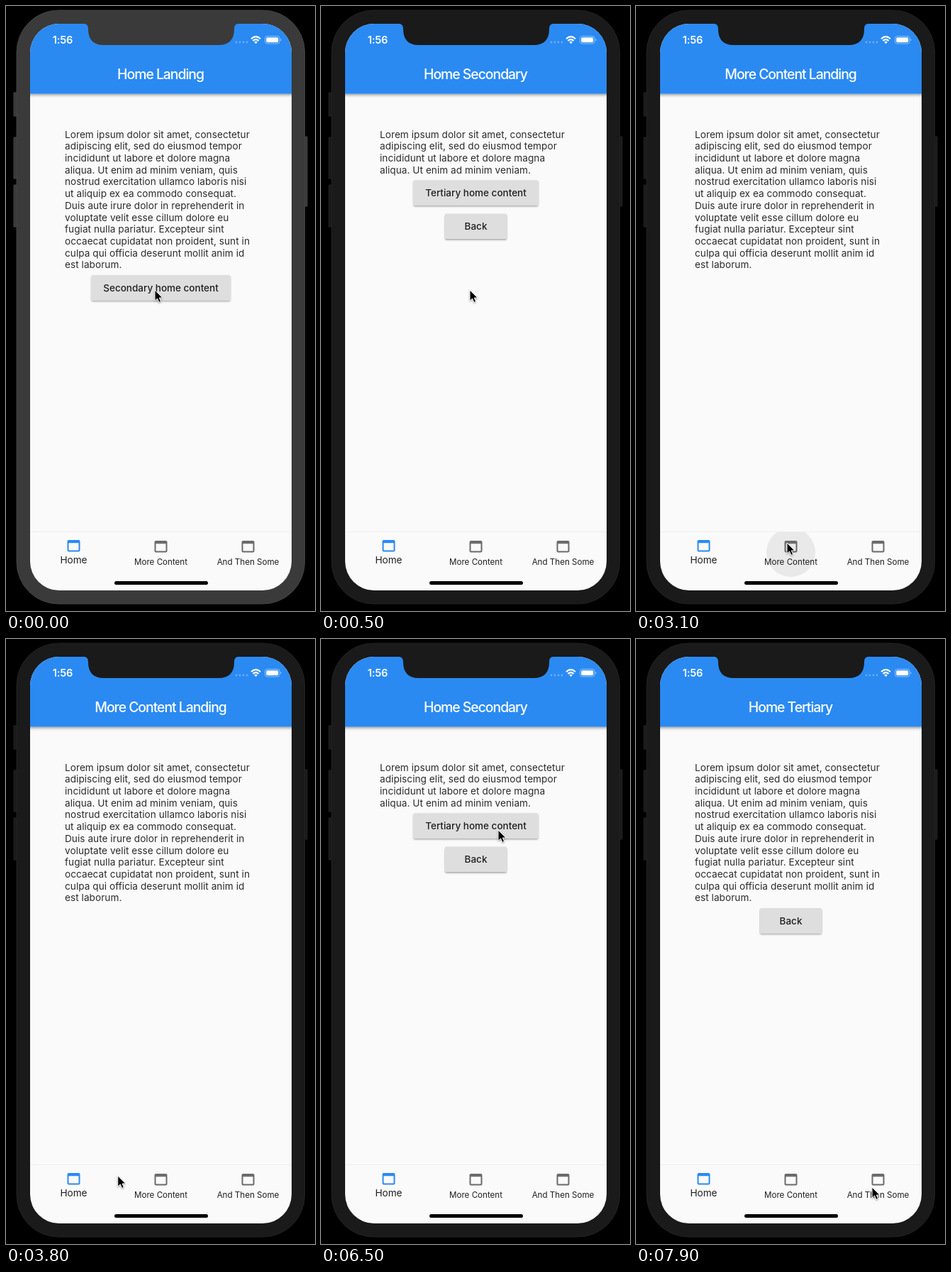
Animation of 436x852 px, one loop 8 s. Source, as an HTML page:

```html
<!DOCTYPE html>
<html lang="en">
<head>
<meta charset="utf-8">
<title>Tab navigation demo</title>
<style>
html, body { margin: 0; width: 100%; height: 100%; overflow: hidden; background: #000; }
svg { display: block; width: 100%; height: 100%; font-family: Inter, Roboto, sans-serif; }
.title { font-size: 19.4px; font-weight: 500; letter-spacing: -1.03px; fill: #fff; }
.body { font-size: 13.6px; letter-spacing: .05px; fill: #2b2b2b; }
.label { font-size: 13.5px; font-weight: 500; fill: #1f1f1f; }
.tab { font-size: 11.6px; fill: #1f1f1f; }
.tab.on { font-size: 13.6px; }
.clock { font-size: 14.6px; font-weight: 600; letter-spacing: -.2px; fill: #fff; }
.mid { text-anchor: middle; }
</style>
</head>
<body>
<svg viewBox="0 0 436 852" xmlns="http://www.w3.org/2000/svg">
  <defs>
    <clipPath id="screenClip"><rect x="34" y="25" width="369" height="798" rx="41"/></clipPath>
    <clipPath id="barClip"><rect x="34" y="741" width="369" height="82"/></clipPath>
    <filter id="drop" x="-10%" y="-20%" width="120%" height="160%">
      <feDropShadow dx="0" dy="1.5" stdDeviation="1.1" flood-opacity=".36"/>
    </filter>
    <filter id="barDrop" x="-5%" y="-10%" width="110%" height="130%">
      <feDropShadow dx="0" dy="1.5" stdDeviation="2" flood-opacity=".45"/>
    </filter>
  </defs>
  <rect width="436" height="852"/>
  <g id="shell">
    <path d="M11 122h5v33h-5zM11 185h5v58h-5zM11 252h5v59h-5zM420 184h5v98h-5z"/>
    <rect x="15" y="6" width="406.5" height="836" rx="59"/>
  </g>
  <g clip-path="url(#screenClip)">
    <rect x="34" y="25" width="369" height="798" fill="#fafafa"/>
    <rect x="24" y="15" width="389" height="108.5" fill="#2a8af2" filter="url(#barDrop)"/>
    <g id="pages"></g>
    <rect x="34" y="740" width="369" height="1" fill="#eee"/>
    <circle id="ripple" cy="769.5" clip-path="url(#barClip)"/>
    <g id="tabs"></g>
    <rect x="153" y="810" width="132" height="5" rx="2.5"/>
  </g>
  <path id="notch" d="M108 24.5C114 25 116 27 116 33C116 47 123 55 138 55H300C315 55 322 47 322 33C322 27 324 25 330 24.5Z"/>
  <text class="clock mid" x="80" y="53">1:56</text>
  <g fill="#fff" fill-opacity=".3">
    <circle cx="325" cy="51" r="1.4"/><circle cx="330" cy="51" r="1.4"/>
    <circle cx="335" cy="51" r="1.4"/><circle cx="340" cy="51" r="1.4"/>
  </g>
  <g fill="none" stroke="#fff" stroke-width="2.1">
    <path d="M346 46.2Q352.5 40.2 359 46.2M348.4 49Q352.5 45.2 356.6 49"/>
    <path d="M350.2 50.8Q352.5 48.8 354.8 50.8L352.5 53.2Z" fill="#fff" stroke="none"/>
  </g>
  <rect x="365.5" y="42.5" width="20.5" height="10.5" rx="3" fill="none" stroke="#fff" stroke-opacity=".45"/>
  <rect x="367.2" y="44.2" width="17" height="7" rx="1.6" fill="#fff"/>
  <path d="M387.2 46v3.6q1.4-.5 1.4-1.8t-1.4-1.8z" fill="#fff" fill-opacity=".5"/>
  <path id="cursor" d="M0 0V15.2L3.5 12L5.9 17.4L8.6 16.2L6.3 11H11Z" stroke="#fff" stroke-width="1"
    stroke-linejoin="round" style="filter:drop-shadow(0 1px 1px rgba(0,0,0,.35))"/>
</svg>
<script>
const LOOP = 8000;
const $ = id => document.getElementById(id);

const shortText = [
  "Lorem ipsum dolor sit amet, consectetur",
  "adipiscing elit, sed do eiusmod tempor",
  "incididunt ut labore et dolore magna",
  "aliqua. Ut enim ad minim veniam."
];
const longText = [
  ...shortText.slice(0, 3),
  "aliqua. Ut enim ad minim veniam, quis",
  "nostrud exercitation ullamco laboris nisi",
  "ut aliquip ex ea commodo consequat.",
  "Duis aute irure dolor in reprehenderit in",
  "voluptate velit esse cillum dolore eu",
  "fugiat nulla pariatur. Excepteur sint",
  "occaecat cupidatat non proident, sunt in",
  "culpa qui officia deserunt mollit anim id",
  "est laborum."
];

const text = (cls, x, y, s) => `<text class="${cls}" x="${x}" y="${y}">${s}</text>`;

const button = (label, y, w) =>
  `<rect x="${218.5 - w / 2}" y="${y}" width="${w}" height="35.5" rx="2" fill="#dedede" filter="url(#drop)"/>` +
  text("label mid", 218.5, y + 22.6, label);

const page = (title, lines, buttons = "") =>
  `<g>${text("title mid", 218, 103, title)}` +
  lines.map((s, i) => text("body", 83, 185.6 + i * 16.7, s)).join("") + buttons + "</g>";

const tab = (label, x, on) => {
  const y = on ? 752 : 753, color = on ? "#2a8af2" : "#6b6b6b";
  return `<path fill="${color}" fill-rule="evenodd" d="M${x - 7} ${y}h14q2 0 2 2v12.4q0 2-2 2h-14q-2 0-2-2v-12.4q0-2 2-2z` +
    `M${x - 7} ${y + 4.2}v10.2h14v-10.2z"/>` +
    text("tab mid" + (on ? " on" : ""), x, on ? 784.5 : 786.6, label);
};

$("pages").innerHTML =
  page("Home Landing", longText, button("Secondary home content", 379, 196)) +
  page("Home Secondary", shortText, button("Tertiary home content", 245.3, 176) + button("Back", 292.5, 87)) +
  page("More Content Landing", longText) +
  page("Home Tertiary", longText, button("Back", 379, 87));
$("tabs").innerHTML = tab("Home", 95.5, true) + tab("More Content", 218.5) + tab("And Then Some", 341.5);

// [start time, page index]
const views = [[0, 0], [200, 1], [2900, 2], [4800, 1], [6600, 3]];
// [start time, x]
const taps = [[2860, 218.5], [4760, 95.5]];
// [time, x, y]
const track = [
  [0, 210, 400], [1800, 210, 400], [2000, 220, 598], [2400, 213, 756],
  [3550, 213, 756], [3800, 158, 756], [4300, 91, 756], [5450, 91, 756],
  [5600, 106, 736], [6000, 195, 440], [6400, 250, 269], [6800, 250, 269],
  [7150, 300, 560], [7500, 327, 779], [7700, 327, 779], [7900, 333, 772]
];

const clamp = v => Math.max(0, Math.min(1, v));
const at = (list, t) => list.filter(e => e[0] <= t).pop();

function cursorAt(t) {
  const i = track.findIndex(k => k[0] > t);
  if (i < 0) return track[track.length - 1].slice(1);
  const [a, b] = [track[i - 1], track[i]];
  const p = (t - a[0]) / (b[0] - a[0]);
  const next = track[i + 1];
  const stops = next && next[1] === b[1] && next[2] === b[2];
  const e = stops ? 1 - (1 - p) ** 2 : p;
  return [a[1] + (b[1] - a[1]) * e, a[2] + (b[2] - a[2]) * e];
}

function draw(t) {
  const shade = t < 100 ? "#3a3a3a" : "#1a1a1a";
  $("shell").setAttribute("fill", shade);
  $("shell").setAttribute("stroke", t < 100 ? "#424242" : "#222");
  $("notch").setAttribute("fill", shade);

  const current = at(views, t)[1];
  [...$("pages").children].forEach((g, i) => g.style.display = i === current ? "" : "none");

  const tap = at(taps, t);
  const age = tap ? t - tap[0] : 1e4;
  $("ripple").setAttribute("cx", tap ? tap[1] : 0);
  $("ripple").setAttribute("r", 34.5 * (1 - (1 - clamp(age / 130)) ** 2));
  $("ripple").setAttribute("fill-opacity", .085 * clamp(1 - (age - 180) / 300));

  $("cursor").setAttribute("transform", `translate(${cursorAt(t)})`);
}

const start = performance.now();
function tick() {
  draw((performance.now() - start) % LOOP);
  requestAnimationFrame(tick);
}
draw(0);
tick();
</script>
</body>
</html>
```
